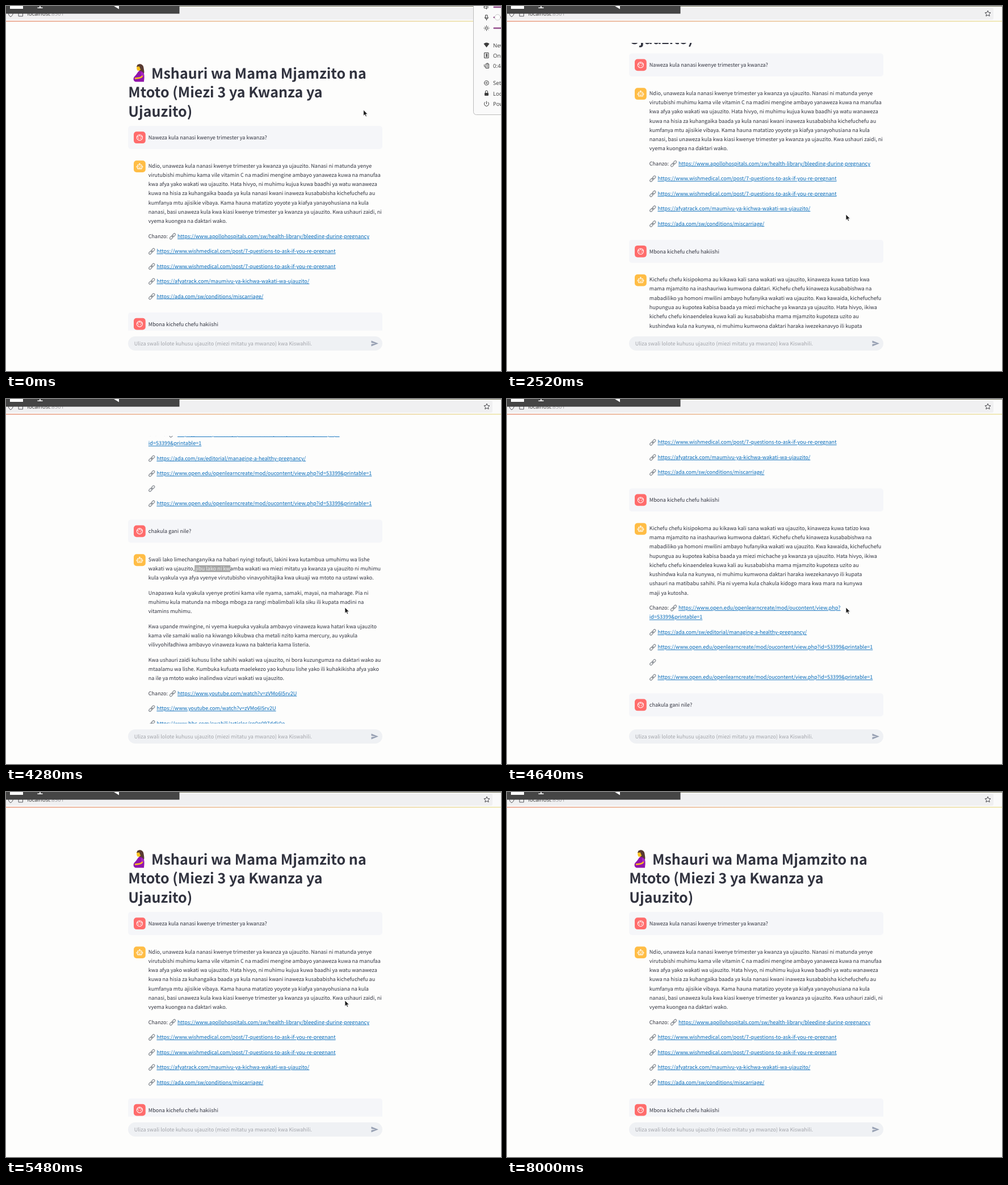
An HTML page for the animation above (8.04 s loop, 872 by 643 pixels).

```html
<!DOCTYPE html>
<html lang="sw">
<head>
<meta charset="utf-8">
<title>Mshauri wa Mama Mjamzito</title>
<style>
html, body { margin: 0; width: 100%; height: 100%; overflow: hidden; background: #fdfdfc; }
svg { display: block; }
text { font-family: "Noto Sans CJK JP", "Noto Sans CJK SC", "Noto Sans", sans-serif; font-size: 9.11px; fill: #31333f; text-rendering: geometricPrecision; white-space: pre; }
.title { font-size: 25.1px; font-weight: 700; }
.link { fill: #0068b9; text-decoration: underline; text-decoration-thickness: .8px; text-underline-offset: 1px; }
.hint { fill: #a2a4aa; }
.ui { font-family: "Open Sans", "Noto Sans", sans-serif; font-size: 9.6px; fill: #3a3a3a; }
.line { fill: none; stroke-linecap: round; stroke-linejoin: round; }
</style>
</head>
<body>
<svg id="stage" width="872" height="643" viewBox="0 0 872 643" xmlns="http://www.w3.org/2000/svg"></svg>
<script>
const LOOP = 8040;
const LEADING = 16.28, PAD = 10.18, TEXT_X = 250.8;
const OPEN_A = 'https://www.open.edu/openlearncreate/mod/oucontent/view.php?';
const OPEN_B = 'id=53399&amp;printable=1';
const WISH = 'https://www.wishmedical.com/post/7-questions-to-ask-if-you-re-pregnant';
const TUBE = 'https://www.youtube.com/watch?v=zVMo6I5rv2U';
const NEWS = 'https://www.bbc.com/swahili/articles/cn0n097ddk0o';

// Paragraphs are strings; sources are arrays of link lines.
const chat = [
  { user: 'Naweza kula nanasi kwenye trimester ya kwanza?' },
  { bot: [
    `Ndio, unaweza kula nanasi kwenye trimester ya kwanza ya ujauzito. Nanasi ni matunda yenye
virutubishi muhimu kama vile vitamin C na madini mengine ambayo yanaweza kuwa na manufaa
kwa afya yako wakati wa ujauzito. Hata hivyo, ni muhimu kujua kuwa baadhi ya watu wanaweza
kuwa na hisia za kuhangaika baada ya kula nanasi kwani inaweza kusababisha kichefuchefu au
kumfanya mtu ajisikie vibaya. Kama hauna matatizo yoyote ya kiafya yanayohusiana na kula
nanasi, basi unaweza kula kwa kiasi kwenye trimester ya kwanza ya ujauzito. Kwa ushauri zaidi, ni
vyema kuongea na daktari wako.`,
    ['https://www.apollohospitals.com/sw/health-library/bleeding-during-pregnancy'],
    [WISH], [WISH],
    ['https://afyatrack.com/maumivu-ya-kichwa-wakati-wa-ujauzito/'],
    ['https://ada.com/sw/conditions/miscarriage/'],
  ] },
  { user: 'Mbona kichefu chefu hakiishi' },
  { bot: [
    `Kichefu chefu kisipokoma au kikawa kali sana wakati wa ujauzito, kinaweza kuwa tatizo kwa
mama mjamzito na inashauriwa kumwona daktari. Kichefu chefu kinaweza kusababishwa na
mabadiliko ya homoni mwilini ambayo hufanyika wakati wa ujauzito. Kwa kawaida, kichefuchefu
hupungua au kupotea kabisa baada ya miezi michache ya kwanza ya ujauzito. Hata hivyo, ikiwa
kichefu chefu kinaendelea kuwa kali au kusababisha mama mjamzito kupoteza uzito au
kushindwa kula na kunywa, ni muhimu kumwona daktari haraka iwezekanavyo ili kupata
ushauri na matibabu sahihi. Pia ni vyema kula chakula kidogo mara kwa mara na kunywa
maji ya kutosha.`,
    [OPEN_A, OPEN_B],
    ['https://ada.com/sw/editorial/managing-a-healthy-pregnancy/'],
    [OPEN_A + OPEN_B], [''], [OPEN_A + OPEN_B],
  ] },
  { user: 'chakula gani nile?' },
  { bot: [
    `Swali lako limechanganyika na habari nyingi tofauti, lakini kwa kutambua umuhimu wa lishe
wakati wa ujauzito,[ jibu lako ni kw]amba wakati wa miezi mitatu ya kwanza ya ujauzito ni muhimu
kula vyakula vya afya vyenye virutubisho vinavyohitajika kwa ukuaji wa mtoto na ustawi wako.`,
    `Unapaswa kula vyakula vyenye protini kama vile nyama, samaki, mayai, na maharage. Pia ni
muhimu kula matunda na mboga mboga za rangi mbalimbali kila siku ili kupata madini na
vitamins muhimu.`,
    `Kwa upande mwingine, ni vyema kuepuka vyakula ambavyo vinaweza kuwa hatari kwa ujauzito
kama vile samaki walio na kiwango kikubwa cha metali nzito kama mercury, au vyakula
vilivyohifadhiwa ambavyo vinaweza kuwa na bakteria kama listeria.`,
    `Kwa ushauri zaidi kuhusu lishe sahihi wakati wa ujauzito, ni bora kuzungumza na daktari wako au
mtaalamu wa lishe. Kumbuka kufuata maelekezo yao kuhusu lishe yako ili kuhakikisha afya yako
na ile ya mtoto wako inalindwa vizuri wakati wa ujauzito.`,
    [TUBE], [TUBE], [NEWS], [NEWS], [NEWS],
  ] },
];

const text = (x, y, str, cls = '') => `<text x="${x}" y="${y.toFixed(2)}" class="${cls}">${str}</text>`;
const rect = (x, y, w, h, r, fill, extra = '') =>
  `<rect x="${x}" y="${y}" width="${w}" height="${h}" rx="${r}" fill="${fill}" ${extra}/>`;
const at = (x, y, body, extra = '') => `<g transform="translate(${x} ${y})" ${extra}>${body}</g>`;
const stroke = (d, color, width = 1) => `<path class="line" d="${d}" stroke="${color}" stroke-width="${width}"/>`;

const chain = (x, y) => at(x, y, `<g transform="rotate(-45)" fill="none" stroke="#8d9298" stroke-width="1.3">
  <rect x="-6.4" y="-1.9" width="6.4" height="3.8" rx="1.9"/><rect x="0" y="-1.9" width="6.4" height="3.8" rx="1.9"/>
  <path d="M-2.2 0H2.2"/></g>`);

const avatar = (y, color, face) => at(235.4, y, rect(-10.4, -10.4, 20.8, 20.8, 5, color) + face);
const eyes = (x, y) => [-x, x].map(cx => `<circle cx="${cx}" cy="${y}" r=".8" fill="#fff"/>`).join('');

const userFace = y => avatar(y, '#ff6c6c',
  `<circle r="5" fill="none" stroke="#fff" stroke-width="1.1"/>` +
  stroke('M-4.7-1C-2.5-1-.8-2-.2-4 .8-2 2.6-1.2 4.6-1.4', '#fff') + eyes(1.8, 1.2));

const botFace = y => avatar(y, '#ffbd45',
  `<rect x="-3.9" y="-2.9" width="7.8" height="7.2" rx="1" fill="none" stroke="#fff" stroke-width="1.1"/>` +
  stroke('M0-3V-5M-1-5H1M-5.4-.2V1.5M5.4-.2V1.5M-1.9 2.4H1.9', '#fff') + eyes(1.7, -.2));

function sourceBlock(lines, y, first) {
  const x = first ? 287.5 : TEXT_X;
  return (first ? text(TEXT_X, y, 'Chanzo:') : '') + chain(x + 6, y - 3) +
    lines.map((s, i) => text(i ? TEXT_X : x + 14.6, y + i * LEADING, s, 'link')).join('');
}

function paragraph(lines, y) {
  return lines.map((s, i) => {
    const base = y + i * LEADING;
    const marked = s.replace('[', '<tspan fill="#f4f4f4">').replace(']', '</tspan>');
    return (marked !== s ? rect(332.3, base - 9.2, 63, 12, 0, '#a8a8a8') : '') + text(TEXT_X, base, marked);
  }).join('');
}

function layoutChat(y) {
  let out = '';
  for (const { user, bot } of chat) {
    if (user) {
      out += rect(215, y, 448, 40.7, 5, '#f5f6f9') + userFace(y + 20.4) + text(TEXT_X, y + 23.8, user);
      y += 40.7 + PAD;
      continue;
    }
    out += botFace(y + 20.4);
    let base = y + 22.4, seenSource = false;
    for (const block of bot) {
      const isSource = Array.isArray(block);
      const lines = isSource ? block : block.split('\n');
      out += isSource ? sourceBlock(lines, base, !seenSource) : paragraph(lines, base);
      seenSource = seenSource || isSource;
      base += lines.length * LEADING + PAD;
    }
    y = base - LEADING - PAD + 25.2;
  }
  return { out, end: y };
}

const mother = at(222, 101, `
  <path d="M9 3C13-.5 20 1 20.5 8 21 12 22 15 21 18L14 17 11 8Z" fill="#593b31"/>
  <path d="M8.3 5C10 3 15 3.5 15.5 8 15.5 11 14 13 11 13 8.5 13 8 10 8.3 5Z" fill="#f9c01e"/>
  <path d="M8 6C9 1.5 16 .5 18 6L17 12 14 9 13 5.5Z" fill="#593b31"/>
  <path d="M11.5 14C16 12.5 21 15 21.5 21 22 26 21 30 21 32.5H6C2 31 1.5 26 4.5 23 7 21 8.5 18 11.5 14Z" fill="#9115ac"/>
  <path d="M18.5 19C19 24 16 26 6 26.5" fill="none" stroke="#f9c01e" stroke-width="2.6" stroke-linecap="round"/>
  <path d="M15.5 16C18 15 21 17 20.5 22L16.5 21.5Z" fill="#a928c4"/>`);

const title = mother + text(256, 127.7, 'Mshauri wa Mama Mjamzito na', 'title') +
  text(215.3, 161.4, 'Mtoto (Miezi 3 ya Kwanza ya', 'title') + text(215.3, 195.1, 'Ujauzito)', 'title') +
  at(338.5, 187.7, stroke('M-1-2.5H-2.5A2.5 2.5 0 0 0-2.5 2.5H-1M1-2.5H2.5A2.5 2.5 0 0 1 2.5 2.5H1M-2 0H2', '#9b9da3', 1.1), 'id="anchor"');

const star = Array.from({ length: 10 }, (_, i) => {
  const r = i % 2 ? 2.5 : 5.3, a = (i * 36 - 90) * Math.PI / 180;
  return `${(r * Math.cos(a)).toFixed(2)},${(r * Math.sin(a)).toFixed(2)}`;
}).join(' ');

const browser = rect(0, 0, 872, 26, 0, '#fafafa') + rect(-10, 3, 867, 21, 3, '#f0f0f1') +
  rect(300, 0, 572, 1, 0, '#77775f') + rect(0, 26.2, 872, 1.3, 0, 'url(#rainbow)') +
  stroke('M4 11C6 11 7.5 10 8 9.5 9 10.5 11 11 12.5 11 12.5 15 11 17.5 8 19 5.5 17.5 4 15 4 11Z', '#5b5b60') +
  stroke('M22.5 12H29.5V18H22.5ZM24 12V9H28V12', '#5b5b60') +
  text(37.5, 17, 'localhost<tspan fill="#99999d">:8501</tspan>', 'ui') +
  at(847, 13.5, `<polygon points="${star}" fill="none" stroke="#45454a" stroke-linejoin="round"/>`) +
  rect(-2, -4, 307, 17, 0, '#454545', 'stroke="#383838"') + rect(7, 0, 23, 5, 0, '#fff') +
  stroke('M60 0V3M56 3.3H64', '#fff', 1.6) + '<path d="M190 0H199V5.5Z" fill="#fff"/>';

const rowIcons = [
  [2, 'M-4-1.5H-2L0-3.5V3.5L-2 1.5H-4ZM2-2Q3.5 0 2 2'],
  [20, 'M-1.5-4H1.5V1H-1.5ZM-3 0Q-3 3 0 3 3 3 3 0M0 3V5'],
  [39, 'M-2 0A2 2 0 1 0 2 0 2 2 0 1 0-2 0M0-4.5V-3.5M0 3.5V4.5M-4.5 0H-3.5M3.5 0H4.5M-3-3L-2.5-2.5M3 3L2.5 2.5M-3 3L-2.5 2.5M3-3L2.5-2.5'],
  [87, 'M-3.5-4.5H3.5V4.5H-3.5ZM-1.8-1.8L1.8 1.5 0 3V-3L1.8-1.5-1.8 1.8'],
  [105.5, 'M-1-3.5H4V4H-1ZM.5-4.5H2.5M-4-2V0Q-4 2-2.5 2M1.5-2V2.5'],
  [135.5, 'M-3.8 0A3.8 3.8 0 1 0 3.8 0 3.8 3.8 0 1 0-3.8 0M-1.2 0A1.2 1.2 0 1 0 1.2 0 1.2 1.2 0 1 0-1.2 0'],
  [172.5, 'M-2.8-3A4 4 0 1 0 2.8-3M0-4.5V0'],
];
const rowLabels = [[69, 'New'], [87, 'On'], [105.5, '0:44'], [135.5, 'Settings'], [154, 'Lock'], [172.5, 'Power']];
const panel = `<g id="panel">` +
  rect(823.5, -12, 70, 203.5, 5, '#fafafa', 'stroke="#bcbcbc"') +
  rowIcons.map(([y, d]) => at(846.5, y, stroke(d, '#3d3d3d'))).join('') +
  '<path d="M841.5 66.5Q846.5 62.5 851.5 66.5L846.5 73Z" fill="#3d3d3d"/>' +
  rect(843, 153, 7, 5, 1, '#3d3d3d') + at(846.5, 153, stroke('M-2 0V-2A2 2 0 0 1 2-2V0', '#3d3d3d')) +
  [2, 20, 39].map(y => rect(858.5, y - 1.2, 16, 2.4, 1, '#924d8b')).join('') +
  '<circle cx="866" cy="20" r="5" fill="#fff" stroke="#c8c8c8"/>' +
  rowLabels.map(([y, s]) => text(858, y + 3.5, s, 'ui')).join('') + '</g>';

const input = rect(215, 582, 448, 25, 12.5, '#eff1f4') +
  text(225.7, 597.9, 'Uliza swali lolote kuhusu ujauzito (miezi mitatu ya mwanzo) kwa Kiswahili.', 'hint') +
  '<path d="M643.5 589.5L656 594.5 643.5 599.5V595.7L651 594.5 643.5 593.3Z" fill="#98a1b3"/>';

const messages = layoutChat(211.3);
const bottom = messages.end - 580;

const stage = document.getElementById('stage');
stage.innerHTML = `<defs>
  <linearGradient id="rainbow" gradientUnits="userSpaceOnUse" x1="0" y1="0" x2="872" y2="0">
    <stop stop-color="#e58a6c"/><stop offset="1" stop-color="#e9df95"/></linearGradient>
  <clipPath id="view"><rect x="200" y="65" width="480" height="506.7"/></clipPath></defs>
  <rect width="872" height="643" fill="#fdfdfc"/>
  <g clip-path="url(#view)"><g id="page">${title}${messages.out}</g></g>
  ${input}${browser}${panel}
  <path id="cursor" d="M0 0V10.5L2.4 8.3 4 12 5.8 11.2 4.2 7.7H7.5Z" fill="#1c1c1c" stroke="#fff" stroke-width=".8"/>`;
const [page, anchor, panelNode, cursor] = ['page', 'anchor', 'panel', 'cursor'].map(id => document.getElementById(id));

// Interpolates [time, ...values] rows, optionally easing each segment.
function track(rows, t, ease = k => k) {
  if (t <= rows[0][0]) return rows[0].slice(1);
  for (let i = 1; i < rows.length; i++) {
    const a = rows[i - 1], b = rows[i];
    if (t < b[0]) {
      const k = ease((t - a[0]) / (b[0] - a[0]));
      return a.slice(1).map((v, j) => v + (b[j + 1] - v) * k);
    }
  }
  return rows[rows.length - 1].slice(1);
}
const smooth = k => k * k * (3 - 2 * k);

const scrollTrack = [[2360, 0], [2480, 70], [2920, bottom - 70], [3040, bottom],
  [4180, bottom], [4280, bottom - 72], [4960, 111], [5120, 0]];
const cursorTrack = [[760, 629.7, 183], [1600, 543, 180], [1840, 543, 180], [2320, 597, 367],
  [6140, 597, 367], [6420, 836, 349.5], [6560, 836, 349.5], [6860, 857, 10]];

function render(t) {
  const [scroll] = track(scrollTrack, t);
  const [x, y] = track(cursorTrack, t, smooth);
  const [opacity] = track([[600, 1], [760, 0]], t);
  page.setAttribute('transform', `translate(0 ${-scroll})`);
  cursor.setAttribute('transform', `translate(${x} ${y})`);
  cursor.setAttribute('visibility', t < 6880 ? 'visible' : 'hidden');
  panelNode.setAttribute('opacity', opacity);
  const hovering = opacity === 0 && x < 663 && y < 202 && t < 2360;
  anchor.setAttribute('visibility', hovering ? 'visible' : 'hidden');
}

const start = performance.now();
function tick() {
  render((performance.now() - start) % LOOP);
  requestAnimationFrame(tick);
}
tick();
</script>
</body>
</html>
```
